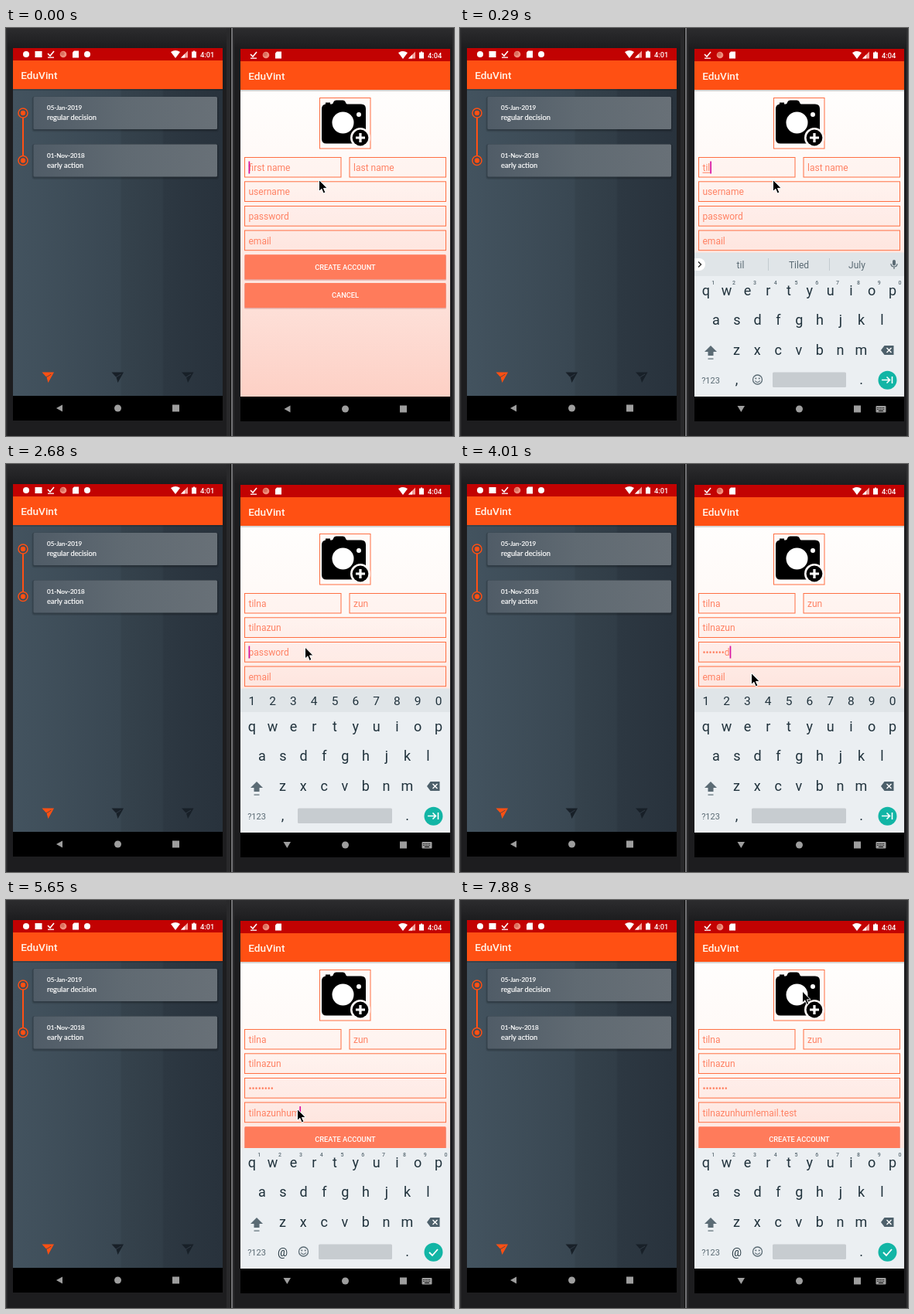
These frames come from a looping animation (579 by 528 pixels, 8 s). An HTML page:

```html
<!DOCTYPE html>
<html lang="en">
<head>
<meta charset="utf-8">
<title>Sign-up form</title>
<style>
html, body { margin: 0; width: 100%; height: 100%; overflow: hidden; background: #1d1d1f; }
svg { display: block; width: 579px; height: 528px; font-family: Roboto, sans-serif; }
.card { font-family: Lato, sans-serif; fill: #fff; stroke: #fff; stroke-width: .2px; }
.mid { text-anchor: middle; }
.medium { font-weight: 500; }
</style>
</head>
<body>
<svg id="stage" viewBox="0 0 579 528" xmlns="http://www.w3.org/2000/svg"></svg>
<script>
const LOOP = 8000;
const ORANGE = '#ff5013', LINE = '#ff6f42', HINT = '#ff8264', TEAL = '#12b5a5';
const INK = '#20323c', GRAY = '#5b6b74', NAV = '#9e9e9e';

const rect = (x, y, w, h, fill, extra = '') =>
  `<rect x="${x}" y="${y}" width="${w}" height="${h}" fill="${fill}" ${extra}/>`;
const circle = (x, y, r, fill, extra = '') => `<circle cx="${x}" cy="${y}" r="${r}" fill="${fill}" ${extra}/>`;
const path = (d, fill, extra = '') => `<path d="${d}" fill="${fill}" ${extra}/>`;
const stroke = (d, color, width, extra = '') => path(d, 'none', `stroke="${color}" stroke-width="${width}" ${extra}`);
const text = (x, y, size, fill, str, cls = '', id = '') =>
  `<text x="${x}" y="${y}" font-size="${size}" fill="${fill}" class="${cls}" ${id && `id="${id}"`}>${str}</text>`;
const group = (id, body) => `<g id="${id}">${body}</g>`;
const gradient = (id, dir, stops) =>
  `<linearGradient id="${id}" x1="0" y1="0" ${dir}="1" ${dir === 'y2' ? 'x2="0"' : 'y2="0"'}>` +
  stops.map(([o, c]) => `<stop offset="${o}" stop-color="${c}"/>`).join('') + '</linearGradient>';

const check = x => stroke(`M${x - 4} 33l3 3 5-6`, '#fff', 1.6) + rect(x - 4, 37.5, 8, 1.3, '#fff');
const sdCard = x => path(`M${x - 2} 29.5h6v9h-8v-7z`, '#fff');
const ball = x => circle(x, 34, 4.3, '#f08f7d') + circle(x - 1, 33, 2.6, '#d9705f');
const backKey = (x, y) => path(`M${x - 4} ${y}l8-4.5v9z`, NAV);

function statusBar(x, time) {
  return path(`M${x + 204} 31q6-4 12 0l-6 8z`, '#fff') +
    path(`M${x + 226} 29.5v9h-9z`, '#f3a39d') + path(`M${x + 222} 33.5v5h-5z`, '#fff') +
    path(`M${x + 231} 30.5h2v-1h2v1h2v8h-6z`, '#fff') +
    text(x + 242, 38, 9.3, '#fff', time, 'medium');
}

function phone(x, time, icons, background) {
  return rect(x, 26, 271, 16, '#c20202') + icons + statusBar(x, time) +
    rect(x, 79, 271, 397, background) + rect(x, 79, 271, 2, '#000', 'opacity=".16"') +
    rect(x, 42, 271, 37, ORANGE) + text(x + 10.3, 65.7, 13.6, '#fff4ea', 'EduVint', 'medium') +
    rect(x, 476, 271, 32, '#000') + circle(x + 135.5, 492, 4.5, NAV) + rect(x + 206, 487.5, 9, 9, NAV);
}

function plan(y, date, label) {
  return rect(33.5, y - .5, 241.5, 46, '#000', 'rx="3" opacity=".1"') +
    rect(34.5, y, 239, 44, '#000', 'rx="2" opacity=".15"') +
    rect(35.5, y, 237.5, 42, 'url(#card)', 'rx="1.5"') +
    `<g class="card">${text(53, y + 17, 8.05, '#fff', date)}${text(53, y + 30, 9.3, '#fff', label)}</g>` +
    circle(22, y + 21, 6, '#3e4b58', `stroke="${ORANGE}" stroke-width="1.5"`) + circle(22, y + 21, 3.2, ORANGE);
}

const plane = (x, color) =>
  path(`M${x - 7.5} 445.5h15.5l-7.5 13.5-2-7z`, color) + stroke(`M${x - 2} 452l6.5-4`, '#36424d', .8);

function leftPhone() {
  const icons = circle(26, 34, 4, '#fff') + rect(37.5, 30, 9, 8, '#fff') + check(58) + ball(74) + sdCard(90) +
    circle(105, 34, 4, '#fff');
  return phone(9, '4:01', icons, 'url(#slate)') + backKey(69, 492) + stroke('M22 110V171', ORANGE, 2) +
    plan(89, '05-Jan-2019', 'regular decision') + plan(150.5, '01-Nov-2018', 'early action') +
    plane(54, ORANGE) + plane(144, '#182028') + plane(234.5, '#182028');
}

// Form fields: left, top, width, height, hint.
const FIELDS = {
  first: [308.5, 167.5, 124.5, 25.5, 'first name'],
  last: [444, 167.5, 124.5, 25.5, 'last name'],
  user: [308.5, 198.8, 260, 25.7, 'username'],
  pass: [308.5, 230.5, 260, 25.7, 'password'],
  email: [308.5, 262, 260, 25.7, 'email']
};

const field = (id, [x, y, w, h]) =>
  rect(x, y, w, h, 'rgba(255,110,80,.03)', `stroke="${LINE}"`) + text(x + 5, y + 17.6, 12, HINT, '', '', id);

const button = (y, label) => rect(308, y + 1, 261, 32.5, '#a33', 'rx="1.5" opacity=".3"') +
  rect(308.5, y, 260, 32, '#ff7b5b', 'rx="1"') + text(438.5, y + 19.3, 9.25, '#fff', label, 'mid medium');

function camera() {
  return rect(405.5, 90.5, 65.5, 65.5, '#fffaf8', `stroke="${LINE}"`) +
    path('M413 98.5v-2h6v2h2q1.500 0 2-2 1-3 4-3h8q3 0 4 3 .5 2 2 2h18q6 0 6 6v39q0 6-6 6h-45q-6 0-6-6v-39q0-5 5-6z', '#000') +
    circle(435.5, 122.5, 14, '#fff') + circle(456, 112, 3, '#fff') + circle(458, 142, 13, '#fffaf8') +
    circle(458, 142, 10.4, '#000') + stroke('M458 136v12M452 142h12', '#fff', 3.2);
}

const keyRow = (keys, x, y, size = 18) =>
  [...keys].map((k, i) => text(x + i * 26.8, y, size, INK, k, 'mid')).join('');

function keyboard() {
  const arrow = stroke('M545 455.5h10M551.5 451.5l4 4-4 4M558.5 451v9', '#fff', 1.6);
  const smiley = circle(384.5, 455, 6, 'none', `stroke="${GRAY}" stroke-width="1.3"`) +
    circle(382.3, 453.5, 1, GRAY) + circle(386.7, 453.5, 1, GRAY) + stroke('M381.3 456.5q3.2 4 6.4 0', GRAY, 1.2);
  const supers = [...'1234567890'].map((n, i) => text(327.3 + i * 26.8, 332, 7, GRAY, n, 'mid medium')).join('');
  const mic = rect(559, 300, 4, 7.5, GRAY, 'rx="2"') + stroke('M557 305q0 4 4 4t4-4M561 309v3', GRAY, 1.2);
  return group('keyboard',
    group('strip', rect(303, 290.5, 271, 31, '#e0e5e8') +
      group('words', path('M303 298h6a8 8 0 0 1 0 16h-6z', '#fff') + stroke('M308 302.5l3.5 3.5-3.5 3.5', '#333', 1.5) + mic +
        group('choices', rect(398, 298, 1, 16, '#c3cbcf') + rect(477, 298, 1, 16, '#c3cbcf') +
          [362.5, 438, 513].map((x, i) => text(x, 310.5, 12, GRAY, '', 'mid', 'choice' + i)).join('')) +
        text(437.5, 310, 10.5, TEAL, 'Suggest contact names? Tap for info.', 'mid', 'contacts')) +
      group('digits', keyRow('1234567890', 317.8, 312, 15.5))) +
    rect(303, 321, 271, 156, '#ebeff2') +
    keyRow('qwertyuiop', 317.8, 345.7) + group('supers', supers) +
    keyRow('asdfghjkl', 331, 384) + keyRow('zxcvbnm', 357.5, 423) +
    path('M324 411l8 8h-4.500v5h-7v-5H316z', GRAY) + rect(320.5, 427.5, 7, 1.2, GRAY) +
    path('M544 417l4.5-6h12v12h-12z', '#4d606b') + stroke('M551.5 414l6 6M557.5 414l-6 6', '#fff', 1.4) +
    text(324, 459.5, 11, GRAY, '?123', 'mid') + text(357.5, 461, 18, INK, ',', 'mid', 'comma') +
    text(357.5, 461, 14.5, INK, '@', 'mid', 'at') + group('smiley', smiley) +
    rect(404, 445.5, 95, 19.5, '#c7ccd0', 'rx="1.5" id="space"') + text(518.5, 461, 18, INK, '.', 'mid') +
    circle(552.5, 455.8, 12, TEAL) + group('tab', arrow) +
    group('done', stroke('M547 456l4 4 7-8', '#fff', 1.8)) +
    path('M358.5 489h9.5l-4.7 8z', NAV) + rect(537.5, 489, 13, 8.5, NAV, 'rx="1"') +
    stroke('M539 491.5h10M539 493.5h10', '#000', 1, 'stroke-dasharray="1 1"') + rect(541, 495, 6, 1, '#000'));
}

function rightPhone() {
  const icons = check(320) + ball(336) + sdCard(352);
  return `<g transform="translate(0 1)">${phone(303, '4:04', icons, 'url(#blush)')}</g>` + camera() +
    Object.entries(FIELDS).map(([id, box]) => field(id, box)).join('') +
    button(293.3, 'CREATE ACCOUNT') + button(330, 'CANCEL') +
    group('back', backKey(363.5, 493)) + keyboard() +
    rect(0, 0, 0, 1, HINT, 'id="underline"') + rect(0, 0, 1.7, 16, '#d8129f', 'id="caret"') +
    path('M0 0v15l3.4-3.2 2.3 5.6 2.7-1.1-2.4-5.4h4.7z', '#000', 'id="mouse" stroke="#fff"');
}

const bezels = rect(0, 0, 579, 528, '#1d1d1f') + rect(0, 0, 290, 25, 'url(#top)') + rect(294, 0, 285, 26, 'url(#top)') +
  rect(0, 0, 1.5, 528, '#303032') + rect(285, 0, 5, 528, '#29292b') + rect(290, 0, 1, 528, '#0c0c0c') +
  rect(291, 0, 2, 528, '#737376') + rect(293, 0, 2, 528, '#2a2a2c') + rect(577, 0, 2, 528, '#303032');

const stage = document.getElementById('stage');
stage.innerHTML = '<defs>' +
  gradient('top', 'y2', [[0, '#2c2c2e'], [1, '#1d1d1f']]) +
  gradient('slate', 'x2', [[0, '#43535f'], [.51, '#394752'], [.52, '#35424c'], [.71, '#313d47'], [.72, '#2d3842'], [1, '#28323c']]) +
  gradient('card', 'x2', [[0, '#505c67'], [.5, '#606a72'], [1, '#687077']]) +
  gradient('blush', 'y2', [[0, '#fffefd'], [.3, '#fff8f5'], [.5, '#feebe6'], [1, '#fdd0c5']]) +
  '</defs>' + bezels + leftPhone() + rightPhone();

const el = id => document.getElementById(id);

// Each step overrides part of the state from its time on.
const steps = [[0, { focus: 'first', keys: '', choices: null, first: '', last: '', user: '', pass: '', email: '', mouse: [404.5, 196.5] }]];
const step = (time, change) => steps.push([time, change]);
const KEY_TIME = 146;
const type = (start, id, values, more = {}) =>
  values.forEach((value, i) => step(start + i * KEY_TIME, { [id]: value, ...more }));

type(144, 'first', ['ti', 'til', 'tiln', 'tilna'], { keys: 'words', choices: ['til', 'Tiled', 'July'] });
step(740, { focus: 'last', choices: null });
type(1040, 'last', ['z', 'zun'], { choices: ['zun', 'sun', 'sunshine'] });
step(1340, { focus: 'user', choices: null });
step(1490, { user: 't' });
type(1640, 'user', ['til', 'tilna', 'tilnaz', 'tilnazu', 'tilnazun'], { choices: ['til', 'tile', 'until'] });
step(2380, { mouse: [400, 211] });
step(2530, { mouse: [388, 235] });
step(2680, { mouse: [386.5, 237], focus: 'pass', keys: 'digits' });
type(2980, 'pass', [...'password'].map((c, i) => '•'.repeat(i) + c));
step(3720, { mouse: [384, 247] });
step(3870, { mouse: [378, 266] });
step(4005, { mouse: [376.5, 270.5] });
step(4160, { pass: '•'.repeat(8), focus: 'email', keys: 'email' });
type(4460, 'email', ['t', 'til', 'tilna', 'tilnaz', 'tilnazun']);
type(5350, 'email', ['tilnazunh', 'tilnazunhu', 'tilnazunhum']);
step(6100, { email: 'tilnazunhum!' });
type(6550, 'email', ['e', 'ema', 'email', 'email.t', 'email.test'].map(s => 'tilnazunhum!' + s));
step(7590, { focus: '', mouse: [390, 240] });
step(7740, { mouse: [428, 155] });
step(7880, { mouse: [442.5, 118] });
steps.sort((a, b) => a[0] - b[0]);

const show = (id, on) => el(id).setAttribute('visibility', on ? 'inherit' : 'hidden');
const set = (id, attrs) => Object.entries(attrs).forEach(([k, v]) => el(id).setAttribute(k, v));

function render(time) {
  const s = Object.assign({}, ...steps.filter(([t]) => t <= time).map(([, change]) => change));
  for (const id in FIELDS) el(id).textContent = s[id] || FIELDS[id][4];

  const words = s.keys === 'words', digits = s.keys === 'digits', email = s.keys === 'email';
  show('keyboard', s.keys);
  show('back', !s.keys);
  show('strip', !email);
  show('words', words);
  show('digits', digits);
  show('choices', s.choices);
  show('contacts', !s.choices);
  show('supers', !digits);
  show('smiley', !digits);
  show('comma', !email);
  show('at', email);
  show('tab', !email);
  show('done', email);
  set('space', digits ? { x: 377, width: 122 } : { x: 404, width: 95 });
  (s.choices || []).forEach((word, i) => { el('choice' + i).textContent = word; });

  show('caret', s.focus);
  show('underline', words && s[s.focus]);
  if (s.focus) {
    const [x, y] = FIELDS[s.focus];
    const width = s[s.focus] ? el(s.focus).getComputedTextLength() : 0;
    set('caret', { x: x + 5 + width, y: y + 5 });
    set('underline', { x: x + 5, y: y + 19.2, width });
  }
  set('mouse', { transform: `translate(${s.mouse})` });
}

const start = performance.now();
function tick() {
  render((performance.now() - start) % LOOP);
  requestAnimationFrame(tick);
}
tick();
</script>
</body>
</html>
```
